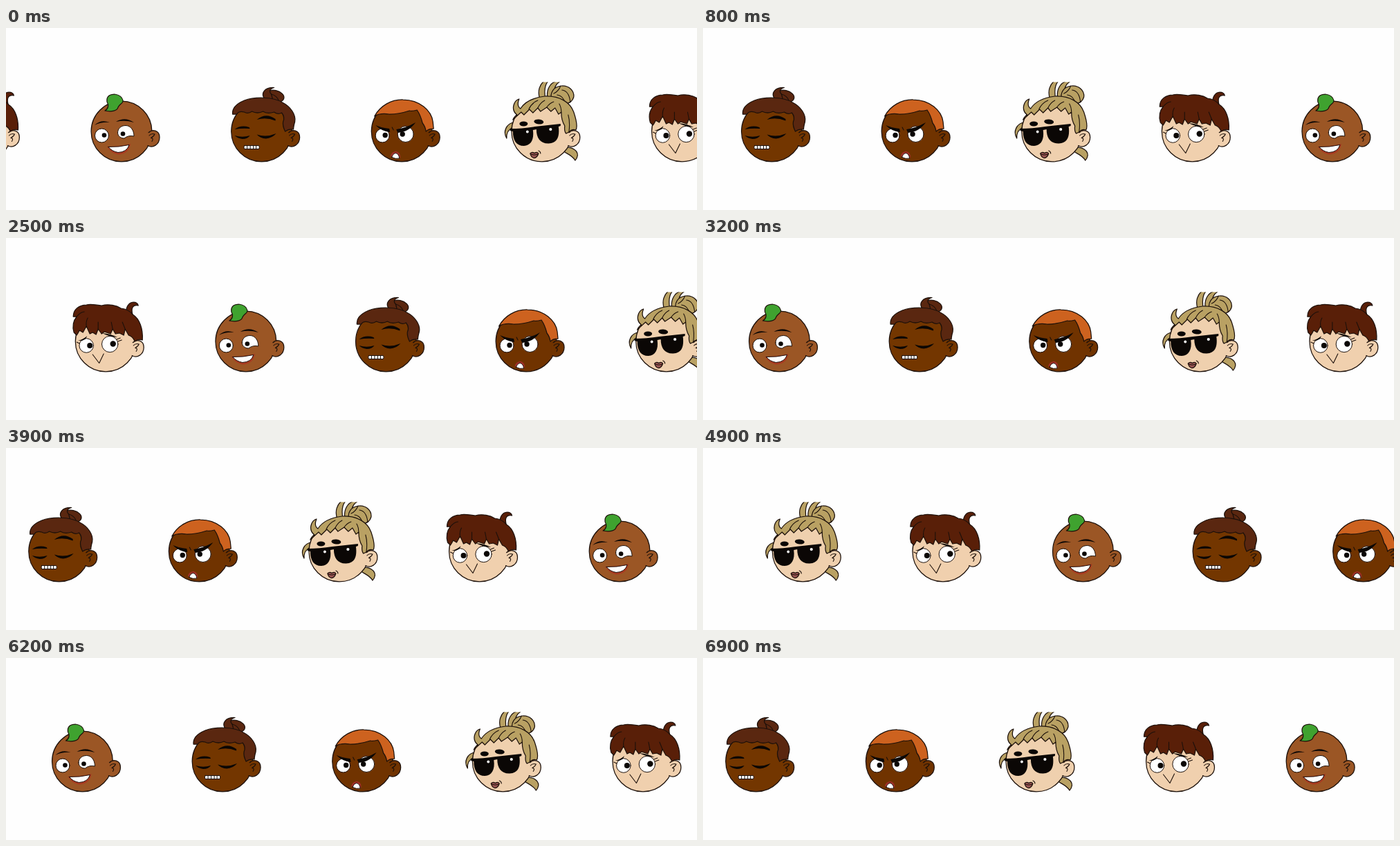
Animation, 999 px wide and 264 px high, one loop 7 s. Source, as an HTML page:

```html
<!DOCTYPE html>
<html lang="en">
<head>
<meta charset="utf-8">
<title>Passing faces</title>
<style>
  html, body { margin: 0; width: 100%; height: 100%; overflow: hidden; background: #fefefe; }
  svg { display: block; width: 999px; height: 264px; }
  g, use { stroke-linecap: round; stroke-linejoin: round; }
  .ln { fill: none; stroke: #1c100a; stroke-width: 1.1; }
  .o { stroke: #1c100a; stroke-width: 1.25; }
  .k { fill: #0b0705; stroke: none; }
  .w { fill: #fff; stroke: #1c100a; stroke-width: 1; }
  .green { fill: #3fa22f; }
  .bun { fill: #5a2710; }
  .orange { fill: #cd621f; }
  .blond { fill: #b9a163; }
  .brown { fill: #591f08; }
</style>
</head>
<body>
<svg viewBox="0 0 999 264">
  <defs>
    <g id="head">
      <circle class="o" r="43.900" fill="currentColor"/>
      <path class="o" fill="currentColor" d="M39 2C44 -4 55 -2 55 8.500C55 19 45 25 38 20.500"/>
      <path d="M36 3L40 2V20L36 20Z" fill="currentColor"/>
      <path class="ln" d="M40 6Q43 2.500 48 4Q47 7 42.500 9.500Q47 10 44 14.500"/>
    </g>

    <g id="grin">
      <use href="#head" color="#9b5625"/>
      <path class="o green" d="M-24 -30C-19 -33 -18 -38 -21 -43C-22 -51 -17 -54 -10 -54C-3 -53 1 -50 2 -45C3 -41 -3 -40 -5 -35C-6 -30 -14 -28 -24 -30Z"/>
      <path class="k" d="M-39 -9Q-30 -18 -17 -13Q-29 -14 -39 -9ZM-8 -14Q5 -22 18 -13Q5 -17 -8 -14Z"/>
      <circle class="w" cx="-28.500" cy="6" r="10"/>
      <circle class="k" cx="-25" cy="5.500" r="3.300"/>
      <path class="w" d="M-5.500 2C-5.500 -4 -1 -8.500 6 -8.500C13 -8.500 18 -2 18 7Q10 5 4 10C-1 10 -5.500 7 -5.500 2Z"/>
      <circle class="k" cx="2" cy="3.500" r="3.300"/>
      <path d="M-21 22Q-4 22 13 18Q11 33 -5 33.500Q-15 32 -21 22Z" fill="#a83a20"/>
      <path class="w" d="M-19 22.500Q-4 23 11 19.500Q8 30 -5 30.500Q-14 29 -19 22.500Z"/>
    </g>

    <g id="calm">
      <use href="#head" color="#733600"/>
      <ellipse class="o bun" cx="19" cy="-51" rx="13.500" ry="8.500" transform="rotate(12 19 -51)"/>
      <path class="o bun" d="M5 -46C-3 -56 5 -64 18 -63.500C12 -62 10 -58 14 -54L16 -46Z"/>
      <path class="ln" d="M14 -54Q22 -52 25 -44"/>
      <path class="o bun" d="M-42 -25C-43 -34 -37 -40 -25 -45C-12 -50 16 -51 30 -42C42 -36 50 -24 48 -14Q46 -7 46 -3Q39 -4 34 0Q30 -8 31 -14Q34 -21 29 -27Q23 -24 18 -28Q8 -25 2 -29Q-6 -25 -14 -29Q-20 -25 -25 -28Q-33 -30 -36 -25Z"/>
      <path class="k" d="M-39 -3Q-30 -10 -18 -6L-17 -4Q-29 -5 -39 -3ZM-7 -17Q6 -28 20 -18L20 -15.500Q6 -21 -7 -17Z"/>
      <path class="k" d="M-39 6Q-28 9.500 -17 6Q-20 11 -28 11Q-35 10 -39 6ZM-7 4.500Q7 9 21 3Q15 10 6 10.500Q-2 10 -7 4.500Z"/>
      <path class="w" d="M-25 20.500H-4Q-2.500 23 -4 25.500H-25Q-26.500 23 -25 20.500ZM-21 20.500V25.500M-16.500 20.500V25.500M-12 20.500V25.500M-8 20.500V25.500"/>
    </g>

    <g id="angry">
      <use href="#head" color="#703300"/>
      <path class="o orange" d="M-39.500 -22A45.500 45.500 0 0 1 2 -46C26 -46 43 -30 45 -14L46 -4Q38 -4 35 0Q34 -7 30 -12Q27 -24 22 -31Q15 -29 11 -30Q-4 -25 -18 -25Q-32 -27 -39.500 -22Z"/>
      <circle class="w" cx="-28" cy="6" r="10"/>
      <circle class="w" cx="5.500" cy="4" r="11.500"/>
      <circle class="k" cx="-24" cy="5.500" r="3.700"/>
      <circle class="k" cx="1" cy="4" r="3.700"/>
      <path class="k" d="M-38 -9Q-29 -5 -18 -4L-17 1Q-29 0 -38 -9ZM-8 -3Q6 -5 20 -13Q10 1 -6 2Z"/>
      <path class="ln" d="M-14 -6L-12 -2"/>
      <path d="M-16.500 36Q-15 29 -8 29Q-2 30 -2 38Q-9 41 -16.500 36Z" fill="#a02f27"/>
      <path class="w" d="M-14.500 37.500Q-13 32 -8.500 31.500Q-4 33 -3.500 39Q-9 40.500 -14.500 37.500Z"/>
    </g>

    <g id="cool" clip-path="url(#trim)">
      <path class="o blond" d="M32 23C44 22 52 28 51.500 35Q51 39 48 42C45 36 38 33 33 30Z"/>
      <path class="o blond" d="M-40 -13C-51 -12 -57 0 -51 10Q-52 -1 -42 -6Z"/>
      <use href="#head" color="#efd0ae"/>
      <path class="o blond" d="M-3 -47C-7 -59 -3 -68 3 -73H9Q2 -65 5 -48ZM8 -48C6 -62 13 -71 21 -73H27Q16 -67 18 -52Z"/>
      <path class="o blond" d="M14 -46C11 -56 17 -65 28 -66C39 -67 47 -59 46 -50C43 -38 24 -36 14 -46Z"/>
      <path class="ln" d="M17 -55Q24 -58 27 -66M22 -53Q31 -52 34 -40M29 -60Q39 -59 41 -43"/>
      <path class="o blond" d="M-36 -24C-46 -32 -40 -45 -33 -47Q-37 -37 -31 -33C-24 -44 -12 -49 4 -51C26 -52 41 -42 46 -28C50 -16 52 -7 49 -2Q43 -4 39 1L35 3Q32 0 33 -8Q28 -16 28 -28L24 -25L19 -34L13 -29L7 -35L-2 -29L-6 -34L-13 -27L-18 -32L-26 -24L-30 -28L-42 -17Q-40 -22 -36 -24Z"/>
      <path class="ln" d="M-19 -32Q-15 -41 -6 -45M-6 -34Q-3 -41 4 -45M7 -35Q11 -41 17 -43M28 -28Q28 -35 25 -40M38 -24Q41 -13 39 1"/>
      <ellipse class="k" cx="-26.500" cy="-11" rx="6" ry="3.400"/>
      <ellipse class="k" cx="-4.500" cy="-14" rx="7" ry="3.500" transform="rotate(6 -4.500 -14)"/>
      <path class="k" d="M-46 -4Q-29 -4 -10 -7L27 -11V-8L24 -7C26 8 22 17 10 17.500C-2 18 -8 10 -8 -3L-13 -2C-11 12 -16 20.500 -26 21C-37 21 -42 13 -42 0L-46 -1Z"/>
      <circle cx="-21" cy="0.500" r="1.900" fill="#fff"/>
      <circle cx="12.500" cy="-3" r="2.100" fill="#fff"/>
      <path class="o" d="M-17 32Q-14 29 -11 31.500Q-7 29 -5 32Q-7 39 -12 38.500Q-16 37 -17 32Z" fill="#985452"/>
      <path class="ln" d="M-16 33Q-11 35 -6 33M-5 28Q-2 29 -2 32"/>
    </g>

    <g id="shy">
      <use href="#head" color="#f0d0ae"/>
      <circle class="w" cx="-28" cy="6" r="10.300"/>
      <circle class="w" cx="6" cy="4" r="11.700"/>
      <circle class="k" cx="-23" cy="6" r="4"/>
      <circle class="k" cx="10.500" cy="3.500" r="4.200"/>
      <path class="ln" d="M16 -3L21 -5M17.500 0L23 -2M-38 3L-42 1"/>
      <path class="k" d="M-40 -1Q-32 -3 -27 -8Q-29 0 -40 -1ZM-5 -12Q7 -11 17 -6Q4 -7 -5 -12Z"/>
      <path class="ln" d="M-19 19L-9.500 31.500L-3 18"/>
      <path class="o brown" d="M31 -38C27 -48 33 -57 40 -57Q46 -57 47 -52C39 -54 36 -48 39 -38Z"/>
      <path class="o brown" d="M-46 -13C-49 -23 -46 -31 -42 -36L-47 -36C-47 -47 -38 -53 -28 -53C-20 -55 -12 -52 -6 -52C4 -55 16 -52 22 -48C30 -47 35 -44 39 -39C49 -33 54 -18 53 -2Q47 -4 42 0Q39 -7 33 -9L28 -18L26 -9L20 -12L14 -11L10 -18L7 -11L-2 -14L-6 -11L-11 -18L-14 -10L-19 -13L-23 -11L-28 -22L-33 -13L-38 -16Q-40 -12 -42 -9Z"/>
      <path class="ln" d="M-28 -22Q-29 -29 -26 -34M-11 -18L-11 -28M10 -18L8 -28M28 -18L24 -28M-42 -36Q-36 -43 -31 -43"/>
    </g>
    <clipPath id="trim"><rect x="-70" y="-71.500" width="140" height="140"/></clipPath>
    <g id="row"></g>
  </defs>
  <rect width="999" height="264" fill="#fefefe"/>
  <g id="belt"></g>
</svg>
<script>
  const GAP = 202.6, SPAN = GAP * 5, SPEED = SPAN / 3;
  const LOOP = 7000, STEP = 100, SKIP = 1600;
  const $ = id => document.getElementById(id);

  function place(parent, id, x) {
    const use = document.createElementNS("http://www.w3.org/2000/svg", "use");
    use.setAttribute("href", "#" + id);
    use.setAttribute("x", x);
    parent.append(use);
  }

  ["grin", "calm", "angry", "cool", "shy"].forEach((id, i) => place($("row"), id, i * GAP));
  [-1, 0, 1].forEach(i => place($("belt"), "row", i * SPAN));

  // Steady drift to the left, with one short hitch at SKIP.
  function draw(ms) {
    const t = Math.floor((ms % LOOP) / STEP) * STEP;
    const start = t < SKIP ? 167 : 178;
    const x = start - SPEED * t / 1000;
    const shift = ((x % SPAN) + SPAN) % SPAN;
    $("belt").setAttribute("transform", `translate(${shift.toFixed(2)} 150)`);
  }

  const begin = performance.now();
  function tick() {
    draw(performance.now() - begin);
    requestAnimationFrame(tick);
  }
  draw(0);
  requestAnimationFrame(tick);
</script>
</body>
</html>
```
